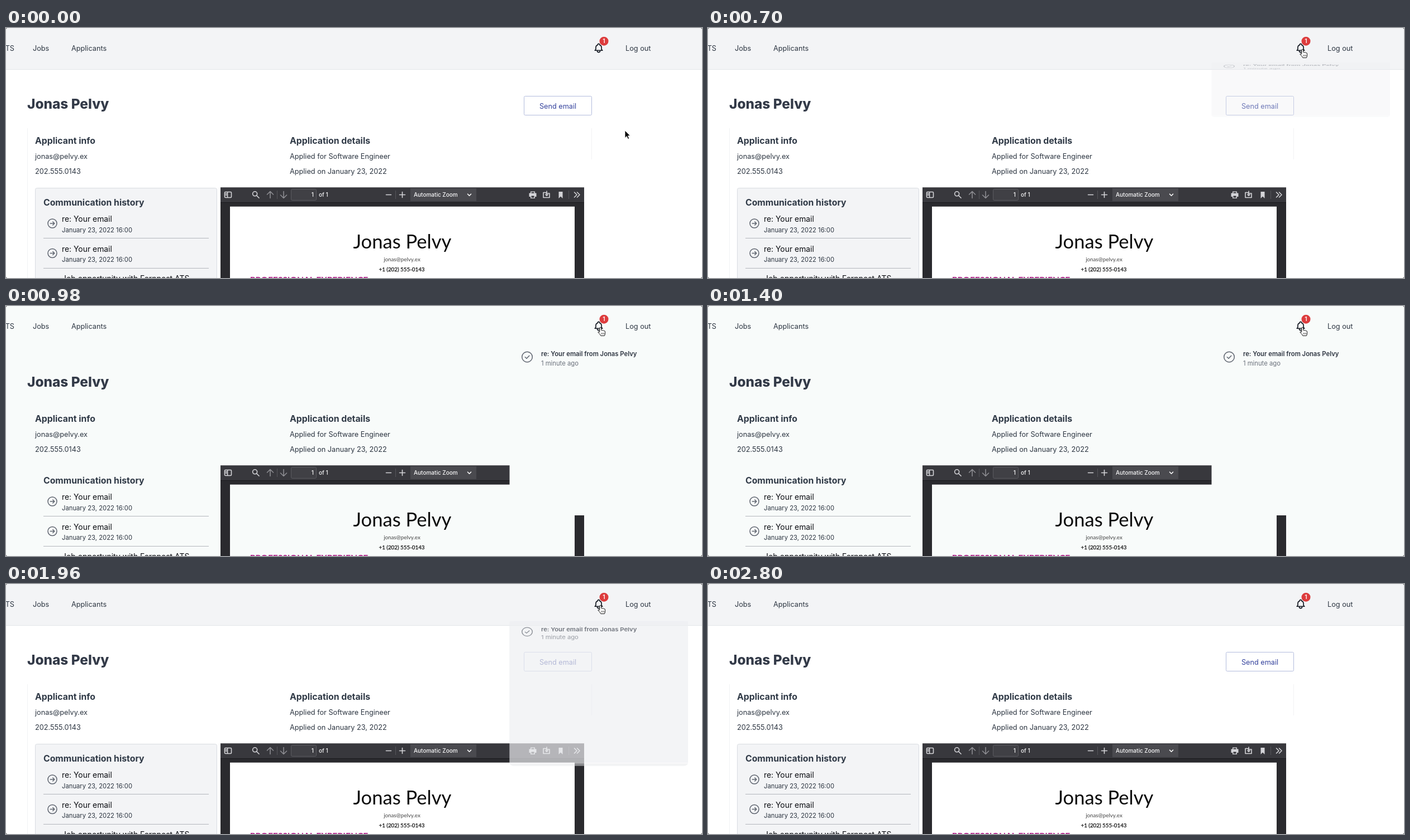
Write an HTML page that moves like this. It is 1246 px wide and 449 px high and loops after 3.22 s.

```html
<!DOCTYPE html>
<html lang="en">
<head>
<meta charset="utf-8">
<title>Applicant notifications</title>
<style>
html, body { margin: 0; width: 100%; height: 100%; overflow: hidden; background: #fff; }
svg { display: block; font: 12.7px Inter, sans-serif; }
text { white-space: pre; }
.page { fill: #fff; }
.grey { fill: #f3f4f6; }
.sheet { fill: #eeeff2; }
.flat .page, .flat .grey, .flat .sheet { fill: #f8fbfa; stroke: none; }
.flat .edge { display: none; }
.body { fill: #2d3642; }
.title { font-size: 24.4px; font-weight: 800; fill: #333a48; }
.head { font-size: 15.8px; font-weight: 700; fill: #303a47; }
.subject { font-size: 13.9px; fill: #0b0d12; }
.small { font-size: 11.25px; }
.line { fill: none; stroke-linecap: round; stroke-linejoin: round; }
.icon { stroke: #5d636e; stroke-width: 1.5; }
.tool { stroke: #d4d4d8; stroke-width: 1.6; }
.dim { stroke: #8c8c91; }
.bar { font-size: 10px; font-weight: 500; fill: #f9f9fa; }
.resume { font-family: Lato, sans-serif; text-anchor: middle; }
.mid { text-anchor: middle; }
</style>
</head>
<body>
<svg id="stage" width="1246" height="449" viewBox="0 0 1246 449">
  <defs>
    <g id="sent" class="line icon">
      <circle r="8"/>
      <path d="M-3.8 0H3.8M.8-3 3.8 0 .8 3"/>
    </g>
  </defs>

  <rect class="page" width="1246" height="449"/>
  <rect class="grey" width="1246" height="74"/>
  <path class="edge" d="M0 74.5H1246" stroke="#e3e6ea"/>
  <path class="edge" d="M38.5 180V449M1048.5 180V236" stroke="#f1f2f4"/>

  <g class="body">
    <text x="15" y="41" text-anchor="end">ATS</text>
    <text x="48" y="41">Jobs</text>
    <text x="117" y="41">Applicants</text>
    <text x="1109" y="41">Log out</text>
  </g>

  <text class="title" x="38" y="144.5">Jonas Pelvy</text>
  <g class="edge">
    <rect x="927.5" y="122.5" width="121" height="34" rx="2" fill="#fff" stroke="#b3bcdd"/>
    <text class="mid" x="988" y="144.5" fill="#35439d">Send email</text>
  </g>

  <text class="head" x="52" y="208">Applicant info</text>
  <text class="head" x="508" y="208">Application details</text>
  <g class="body">
    <text x="52" y="234.5">jonas@pelvy.ex</text>
    <text x="52" y="261.5">202.555.0143</text>
    <text x="508" y="234.5">Applied for Software Engineer</text>
    <text x="508" y="261.5">Applied on January 23, 2022</text>
  </g>

  <rect class="grey" x="52.5" y="287.5" width="325" height="180" rx="3" stroke="#d9dce1"/>
  <text class="head" x="67" y="319">Communication history</text>
  <use href="#sent" x="83" y="351"/>
  <text class="subject" x="100" y="348">re: Your email</text>
  <text class="small body" x="100" y="366.5">January 23, 2022 16:00</text>
  <use href="#sent" x="83" y="404.5"/>
  <text class="subject" x="100" y="401.5">re: Your email</text>
  <text class="small body" x="100" y="420">January 23, 2022 16:00</text>
  <path d="M67 377.5H363M67 431.5H363" stroke="#b3b6bc"/>
  <text class="subject" x="100" y="454.5">Job opportunity with Fernpost ATS</text>

  <!-- document viewer -->
  <rect x="384" y="286.5" width="651" height="163" fill="#2a2a2e"/>
  <rect x="384" y="286.5" width="651" height="26.5" fill="#38383d"/>
  <path d="M384 313.5H1035" stroke="#1b1b1e"/>
  <path d="M485.5 292V307M697.5 292V307M1007.5 292V307" stroke="#55555a"/>
  <rect x="510.5" y="289.5" width="45" height="20" rx="2" fill="#404045" stroke="#5b5b60"/>
  <rect x="724" y="288" width="118" height="23" fill="#4a4a4f"/>
  <g class="line tool">
    <rect x="391.5" y="294.5" width="12" height="10" rx="1.5"/>
    <path d="M396.5 295V304M393 297.5H395M393 300H395"/>
    <circle cx="445.6" cy="297.8" r="4"/>
    <path d="M448.8 301 453 305.2"/>
    <path class="dim" d="M473 305.5V293.5M467.5 299 473 293.5 478.5 299M497 293.5V305.5M491.5 300 497 305.5 502.5 300"/>
    <path d="M680.5 299.5H689.5M704.5 299.5H714.5M709.5 294.5V304.5"/>
    <path d="M826.5 298.2 829.5 301.2 832.5 298.2" stroke="#fff"/>
    <path d="M962 295.5H966L967.5 297H973V304.5H962ZM968 293V301M965.8 299 968 301.2 970.2 299"/>
    <path d="M1017.5 295 1022 299.5 1017.5 304M1022.5 295 1027 299.5 1022.5 304"/>
  </g>
  <path d="M939 293.5H947V296.5H949.5V303H947V306H939V303H936.5V296.5H939ZM989.5 294H996.5V306L993 302.5 989.5 306Z" fill="#d4d4d8"/>
  <path d="M940.5 294.8H945.5V296.8H940.5ZM940.5 301.5H945.5V304.8H940.5Z" fill="#38383d"/>
  <g class="bar">
    <text x="551" y="303" text-anchor="end">1</text>
    <text x="560" y="303">of 1</text>
    <text x="730" y="303">Automatic Zoom</text>
  </g>
  <rect class="page" x="401" y="320.7" width="617" height="129"/>
  <g class="resume">
    <text x="709.5" y="395.5" font-size="34.6" fill="#0c0c0c">Jonas Pelvy</text>
    <text x="709" y="418.5" font-size="9.8" fill="#444">jonas@pelvy.ex</text>
    <text x="708.5" y="436.5" font-size="9.8" fill="#111" stroke="#111" stroke-width=".25">+1 (202) 555-0143</text>
    <text x="542.5" y="458" font-size="15.6" font-weight="700" fill="#b0258b">PROFESSIONAL EXPERIENCE</text>
  </g>

  <!-- notification dropdown -->
  <g id="panel">
    <rect class="edge" x="901.5" y="68.5" width="319.5" height="313.5" rx="7" fill="#e6e7ea" opacity=".75"/>
    <rect class="sheet" x="901.5" y="68.5" width="319.5" height="307.5"/>
    <path class="edge" d="M901.5 376H1221" stroke="#fff"/>
    <g class="line icon">
      <circle cx="933" cy="91.5" r="9.3"/>
      <path d="M929.3 91.8 932 94.3 936.8 89.2"/>
    </g>
    <text class="small" x="958" y="90" font-weight="600" fill="#2d3440">re: Your email from Jonas Pelvy</text>
    <text class="small" x="958" y="107" fill="#6b717c">1 minute ago</text>
  </g>

  <path class="line" transform="translate(1050.8 25.8) scale(.85)" stroke="#151a23" stroke-width="2" d="M15 17h5l-1.4-1.4A2 2 0 0 1 18 14.2V11a6 6 0 0 0-4-5.66V5a2 2 0 1 0-4 0v.34A6 6 0 0 0 6 11v3.2c0 .5-.2 1-.6 1.4L4 17h5m6 0v1a3 3 0 1 1-6 0v-1m6 0H9"/>
  <circle cx="1070.5" cy="23.7" r="8" fill="#dd3c3d"/>
  <text class="mid" x="1070.5" y="27.4" font-size="10.3" font-weight="600" fill="#fff">1</text>

  <circle id="press" cx="1064.2" cy="39" r="28" fill="none" stroke="#111" stroke-width="1.7"/>
  <path id="arrow" d="M0 0V13.5L3.2 10.6 5.5 15.5 7.7 14.5 5.5 9.7H9.6Z" fill="#000" stroke="#fff" stroke-width=".9"/>
  <g id="hand" stroke="#111" stroke-linejoin="round">
    <path transform="translate(-5 -.6)" fill="#fff" d="M3.7 8.5V2Q3.7 .4 5.2 .4T6.7 2V5.6Q7.8 4.8 8.9 6 10.3 5.2 11.3 6.6 13.6 6.2 13.6 8.4V10.8Q13.6 13 12.4 15.4H5.8Q4.8 13 .8 9 1.2 7 3.7 9Z"/>
    <path d="M2 9.4v3M4.2 9.4v3M6.4 9.4v3" stroke-width=".7"/>
  </g>
  <path d="M0 0H2L0 2ZM1246 0V2L1244 0ZM0 449V447L2 449ZM1246 449H1244L1246 447Z" fill="#777"/>
</svg>

<script>
const LOOP = 3220, STEP = 70, FADE = 300;
const OPEN = 616, CLOSE = 1894, PANEL_TOP = 58.5;
const [stage, panel, press, arrow, hand] =
  ['stage', 'panel', 'press', 'arrow', 'hand'].map(id => document.getElementById(id));

const clamp = v => Math.min(1, Math.max(0, v));
const smooth = v => v * v * (3 - 2 * v);
const mix = (a, b, k) => a + (b - a) * k;
const show = (el, on) => el.setAttribute('visibility', on ? 'visible' : 'hidden');

// cubic-bezier(.4, 0, .2, 1)
function ease(x) {
  if (x <= 0 || x >= 1) return clamp(x);
  let lo = 0, hi = 1, u;
  for (let i = 0; i < 24; i++) {
    u = (lo + hi) / 2;
    const at = 1.2 * u * (1 - u) ** 2 + 0.6 * u * u * (1 - u) + u ** 3;
    if (at < x) lo = u; else hi = u;
  }
  return 3 * u * u * (1 - u) + u ** 3;
}

function pointer(t) {
  if (t < 2100) {
    const k = smooth(clamp(t / 560));
    return [mix(1108, 1064, k), mix(184, 38.6, k)];
  }
  const k = clamp((t - 2100) / 700) ** 2.6;
  return [mix(1064, 668, k), mix(38.6, 452, k)];
}

function draw(t) {
  const closing = t >= CLOSE;
  const scale = closing ? 1 - ease((t - CLOSE) / FADE) : ease((t - OPEN) / FADE);
  show(panel, scale > 0);
  panel.setAttribute('opacity', closing ? scale * scale : scale);
  panel.setAttribute('transform', `translate(0 ${PANEL_TOP * (1 - scale)}) scale(1 ${scale})`);
  stage.classList.toggle('flat', t >= 980 && t < 1890);

  show(press, t === 560 || t === 1820);

  const [x, y] = pointer(t);
  const onBell = Math.abs(x - 1061) < 18 && y < 58;
  const visible = t < 2800;
  for (const el of [arrow, hand]) {
    el.setAttribute('transform', `translate(${x} ${y})`);
    show(el, visible && onBell === (el === hand));
  }
}

const start = performance.now();
function tick() {
  const t = (performance.now() - start) % LOOP;
  draw(Math.floor(t / STEP) * STEP);
  requestAnimationFrame(tick);
}
tick();
</script>
</body>
</html>
```
